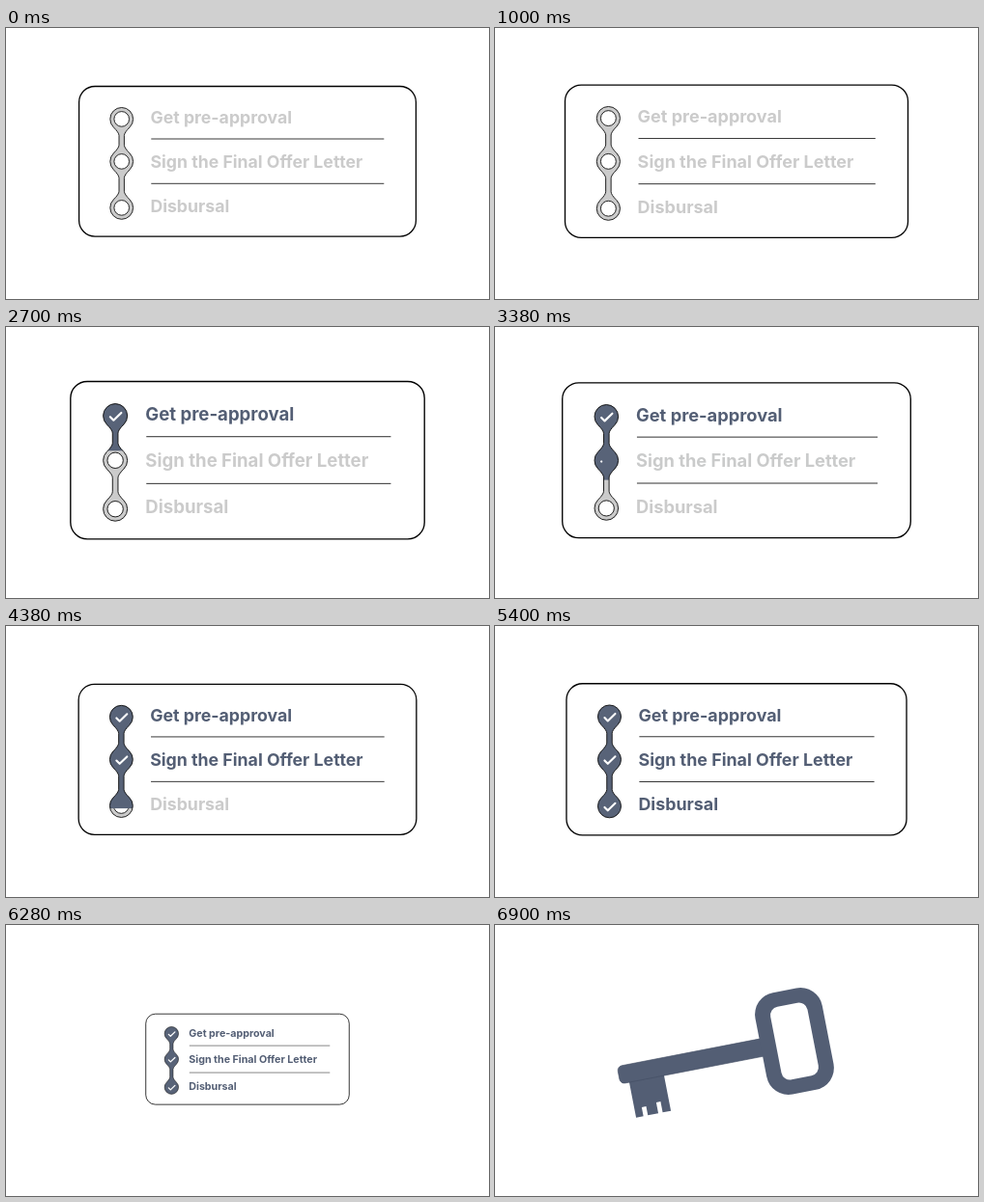
Recreate the animation shown at these times as an HTML page with a canvas. Size 500 px wide and 281 px high, loop 8.4 s.

```html
<!DOCTYPE html>
<html lang="en">
<head>
<meta charset="utf-8">
<title>Loan steps</title>
<style>
  html, body { margin: 0; width: 100%; height: 100%; overflow: hidden; background: #fff; }
  canvas { display: block; width: 500px; height: 281px; }
</style>
</head>
<body>
<canvas id="stage"></canvas>
<script>
const W = 500, H = 281, LOOP = 8400;
const DARK = '#535e74', FILL = '#586378', GREY = '#cbcbcb', INK = '#111';
const canvas = document.getElementById('stage');
const ctx = canvas.getContext('2d');
const dpr = window.devicePixelRatio || 1;
canvas.width = W * dpr;
canvas.height = H * dpr;

const CX = 119.7, R = 11.9, HOLE = 7.8, NECK = 2.7;
const steps = [
  { label: 'Get pre-approval', y: 94.4, base: 99.2, at: 2300 },
  { label: 'Sign the Final Offer Letter', y: 138.4, base: 145.2, at: 3365 },
  { label: 'Disbursal', y: 186.4, base: 190.9, at: 4720 }
];
// time and height of the rising fill edge
const fillKeys = [[1020, 82], [1840, 93.6], [3380, 158], [4380, 189], [5000, 199]];

const clamp = v => Math.max(0, Math.min(1, v));
const part = (t, a, b) => clamp((t - a) / (b - a));
const sine = p => (1 - Math.cos(Math.PI * p)) / 2;

// smooth curve through the keys, flat at both ends
function curve(keys, t) {
  const last = keys.length - 1;
  if (t <= keys[0][0]) return keys[0][1];
  if (t >= keys[last][0]) return keys[last][1];
  const slope = i => i === 0 || i === last ? 0 :
    (keys[i + 1][1] - keys[i - 1][1]) / (keys[i + 1][0] - keys[i - 1][0]);
  let i = 0;
  while (t > keys[i + 1][0]) i++;
  const [t0, v0] = keys[i], [t1, v1] = keys[i + 1];
  const d = t1 - t0, u = (t - t0) / d, w = 1 - u;
  return v0 * (1 + 2 * u) * w * w + v1 * u * u * (3 - 2 * u) +
    d * u * w * (slope(i) * w - slope(i + 1) * u);
}

function cardScale(t) {
  const b = Math.min(t, 6040);
  let swell;
  if (b < 2500) swell = sine(b / 2500);
  else if (b < 4700) swell = 1 - sine((b - 2500) / 2200);
  else swell = sine((b - 4700) / 2500);
  return (1 + 0.0515 * swell) * (1 - sine(part(t, 6040, 6580)));
}

function mix(p) {
  const a = [203, 203, 203], b = [83, 94, 116];
  return `rgb(${a.map((v, i) => Math.round(v + (b[i] - v) * p))})`;
}

function trackPath() {
  const p = new Path2D(), q = Math.PI / 4, k = R * Math.SQRT1_2;
  const [a, b, c] = steps.map(s => s.y);
  const bend = 2 * k - NECK, end = bend + 3;
  const link = (side, from, to) => {
    const d = Math.sign(to - from), x = CX + side * NECK;
    p.quadraticCurveTo(x, from + d * bend, x, from + d * end);
    p.lineTo(x, to - d * end);
    p.quadraticCurveTo(x, to - d * bend, CX + side * k, to - d * k);
  };
  p.arc(CX, a, R, 3 * q, 9 * q);
  link(1, a, b);
  p.arc(CX, b, R, -q, q);
  link(1, b, c);
  p.arc(CX, c, R, -q, 5 * q);
  link(-1, c, b);
  p.arc(CX, b, R, 3 * q, 5 * q);
  link(-1, b, a);
  p.closePath();
  return p;
}
const track = trackPath();

function drawTrack(t) {
  ctx.fillStyle = GREY;
  ctx.fill(track);
  ctx.lineWidth = 0.9;
  ctx.strokeStyle = INK;
  for (const s of steps) {
    ctx.beginPath();
    ctx.arc(CX, s.y, HOLE, 0, 2 * Math.PI);
    ctx.fillStyle = '#fff';
    ctx.fill();
    ctx.stroke();
  }
  ctx.save();
  ctx.clip(track);
  ctx.fillStyle = FILL;
  ctx.fillRect(CX - 20, 70, 40, curve(fillKeys, t) - 70);
  ctx.restore();
  ctx.stroke(track);
}

function drawCheck(y, p) {
  if (p <= 0) return;
  const pts = [[-5, 1.1], [-1.7, 4.4], [5.9, -3]];
  const len = i => Math.hypot(pts[i + 1][0] - pts[i][0], pts[i + 1][1] - pts[i][1]);
  let left = p * (len(0) + len(1));
  ctx.beginPath();
  ctx.moveTo(CX + pts[0][0], y + pts[0][1]);
  for (let i = 0; i < 2 && left > 0; i++) {
    const u = Math.min(1, left / len(i)), [x0, y0] = pts[i], [x1, y1] = pts[i + 1];
    ctx.lineTo(CX + x0 + (x1 - x0) * u, y + y0 + (y1 - y0) * u);
    left -= len(i);
  }
  ctx.strokeStyle = '#fff';
  ctx.lineWidth = 2.1;
  ctx.lineCap = ctx.lineJoin = 'round';
  ctx.stroke();
  ctx.lineCap = 'butt';
}

function drawCard(t) {
  const s = cardScale(t);
  if (s < 0.004) return;
  ctx.save();
  ctx.translate(250, 140.5);
  ctx.scale(s, s);
  ctx.translate(-250, -140.5);
  ctx.beginPath();
  ctx.roundRect(75.6, 60.5, 348.8, 155.6, 16.5);
  ctx.strokeStyle = '#000';
  ctx.lineWidth = 1.3;
  ctx.stroke();
  ctx.lineWidth = 0.9;
  ctx.strokeStyle = '#222';
  for (const y of [115, 161.3]) {
    ctx.beginPath();
    ctx.moveTo(150.3, y);
    ctx.lineTo(391.3, y);
    ctx.stroke();
  }
  drawTrack(t);
  ctx.font = '700 17.7px Poppins, Inter, sans-serif';
  for (const step of steps) {
    const p = sine(part(t, step.at, step.at + 360));
    drawCheck(step.y, p);
    ctx.fillStyle = mix(p);
    ctx.fillText(step.label, 149.4, step.base);
  }
  ctx.restore();
}

function drawKey(t) {
  const p = part(t, 6580, 6900);
  if (p <= 0) return;
  const s = 1 - (1 - p) ** 2;
  ctx.save();
  ctx.translate(239, 132.5);
  ctx.scale(s, s);
  ctx.translate(71, -12);
  ctx.rotate(-11 * Math.PI / 180);
  ctx.fillStyle = DARK;

  // bit with two notches
  ctx.beginPath();
  ctx.moveTo(-176, 8);
  for (const [x, y] of [[-176, 46.4], [-168.3, 46.4], [-168.3, 37], [-163.6, 37],
    [-163.6, 46.4], [-152.6, 46.4], [-152.6, 35], [-148, 35], [-148, 46.4],
    [-139.3, 46.4], [-139.3, 8]]) ctx.lineTo(x, y);
  ctx.fill();

  ctx.beginPath();
  ctx.roundRect(-185.3, -9.3, 155, 18.5, 5);
  ctx.fill();
  ctx.strokeStyle = '#434e64';
  ctx.lineWidth = 0.6;
  ctx.stroke();

  ctx.beginPath();
  ctx.roundRect(-35.3, -53.7, 70.6, 107.4, 23);
  ctx.roundRect(-19.5, -38.5, 39, 77, 9);
  ctx.fill('evenodd');
  ctx.restore();
}

function draw(t) {
  ctx.setTransform(dpr, 0, 0, dpr, 0, 0);
  ctx.fillStyle = '#fff';
  ctx.fillRect(0, 0, W, H);
  drawCard(t);
  drawKey(t);
}

let start = null;
function tick(now) {
  if (start === null) start = now;
  draw((now - start) % LOOP);
  requestAnimationFrame(tick);
}
draw(0);
requestAnimationFrame(tick);
</script>
</body>
</html>
```
